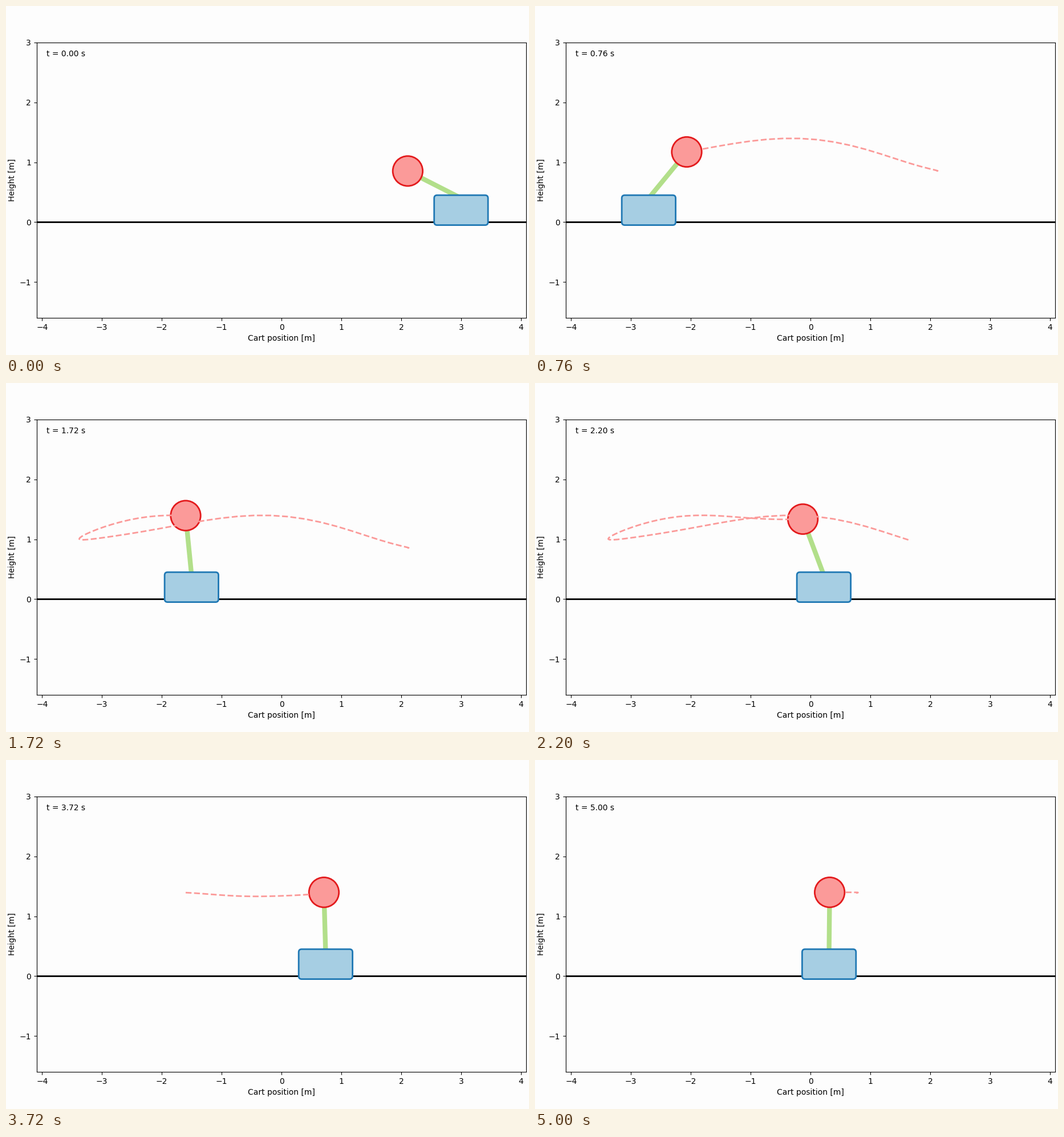
Recreate the animation shown at these times as a matplotlib script. Size 917 px wide and 611 px high, loop 5040 ms.

```python
import numpy as np
import matplotlib.pyplot as plt
from matplotlib.animation import FuncAnimation
from matplotlib.patches import Circle, FancyBboxPatch

WIDTH, HEIGHT, DPI = 917, 611, 100
FRAMES, STEP_MS, TRAIL = 126, 40, 50
PIVOT_Y, POLE = 0.4, 1.0

BACK = "#fdfdfd"
BLUE, BLUE_EDGE = "#a6cee3", "#1f78b4"
RED, RED_EDGE = "#fb9a99", "#e31a1c"
GREEN = "#b2df8a"

# Key poses: time [s], ball position [m], pole angle from upright [rad]
POSES = np.array([
    (0.00, 2.109, -1.10), (0.20, 1.635, -0.94), (0.50, -0.32, 0.00),
    (0.76, -2.068, 0.688), (0.92, -2.96, 0.89), (1.14, -3.378, 0.91),
    (1.45, -2.65, 0.455), (1.80, -1.30, -0.22), (2.20, -0.128, -0.358),
    (2.92, 0.735, -0.157), (3.72, 0.709, -0.028), (5.00, 0.32, 0.01),
])


def spline(t, knots, values, start_slope, end_slope):
    """Clamped cubic spline through the knots."""
    h = np.diff(knots)
    rate = np.diff(values) / h
    n = len(knots)
    a, b = np.eye(n), np.empty(n)
    b[0], b[-1] = start_slope, end_slope
    for i in range(1, n - 1):
        a[i, i - 1:i + 2] = h[i], 2 * (h[i - 1] + h[i]), h[i - 1]
        b[i] = 3 * (h[i] * rate[i - 1] + h[i - 1] * rate[i])
    m = np.linalg.solve(a, b)

    k = np.clip(np.searchsorted(knots, t, side="right") - 1, 0, n - 2)
    u = (t - knots[k]) / h[k]
    v = 1 - u
    return (values[k] * v * v * (1 + 2 * u) + values[k + 1] * u * u * (1 + 2 * v)
            + h[k] * u * v * (m[k] * v - m[k + 1] * u))


# The rigid pole ties the ball height and the cart to the angle
times = np.arange(FRAMES) * STEP_MS / 1000
key_t, key_x, key_angle = POSES.T
ball_x = spline(times, key_t, key_x, 1.3, -0.27)
angle = spline(times, key_t, key_angle, 0, 0)
ball_y = PIVOT_Y + POLE * np.cos(angle)
cart_x = ball_x - POLE * np.sin(angle)

fig = plt.figure(figsize=(WIDTH / DPI, HEIGHT / DPI), dpi=DPI, facecolor=BACK)
left, right, top, bottom = 53.8, 912.3, 64, 546
ax = fig.add_axes([left / WIDTH, 1 - bottom / HEIGHT,
                   (right - left) / WIDTH, (bottom - top) / HEIGHT],
                  facecolor=BACK)
ax.set(xlim=(-4.09, 4.09), ylim=(-1.6, 3), yticks=range(-1, 4),
       xlabel="Cart position [m]", ylabel="Height [m]")

ax.axhline(0, color="black", lw=2, zorder=0)
pole, = ax.plot([], [], color=GREEN, lw=6, zorder=1)
cart = FancyBboxPatch((0, 0), 0.8, 0.4, boxstyle="round,pad=0.05",
                      fc=BLUE, ec=BLUE_EDGE, lw=2, zorder=2)
ball = Circle((0, 0), 0.25, fc=RED, ec=RED_EDGE, lw=2, zorder=2)
ax.add_patch(cart)
ax.add_patch(ball)
trail, = ax.plot([], [], "--", color=RED, lw=2, zorder=2.2)
clock = ax.text(0.02, 0.95, "", transform=ax.transAxes)


def draw(i):
    pole.set_data([cart_x[i], ball_x[i]], [PIVOT_Y, ball_y[i]])
    cart.set_x(cart_x[i] - 0.4)
    ball.center = ball_x[i], ball_y[i]
    past = slice(max(0, i - TRAIL), i + 1)
    trail.set_data(ball_x[past], ball_y[past])
    clock.set_text(f"t = {times[i]:.2f} s")
    return pole, cart, ball, trail, clock


anim = FuncAnimation(fig, draw, frames=FRAMES, interval=STEP_MS,
                     repeat=True, repeat_delay=0)
plt.show()
```
